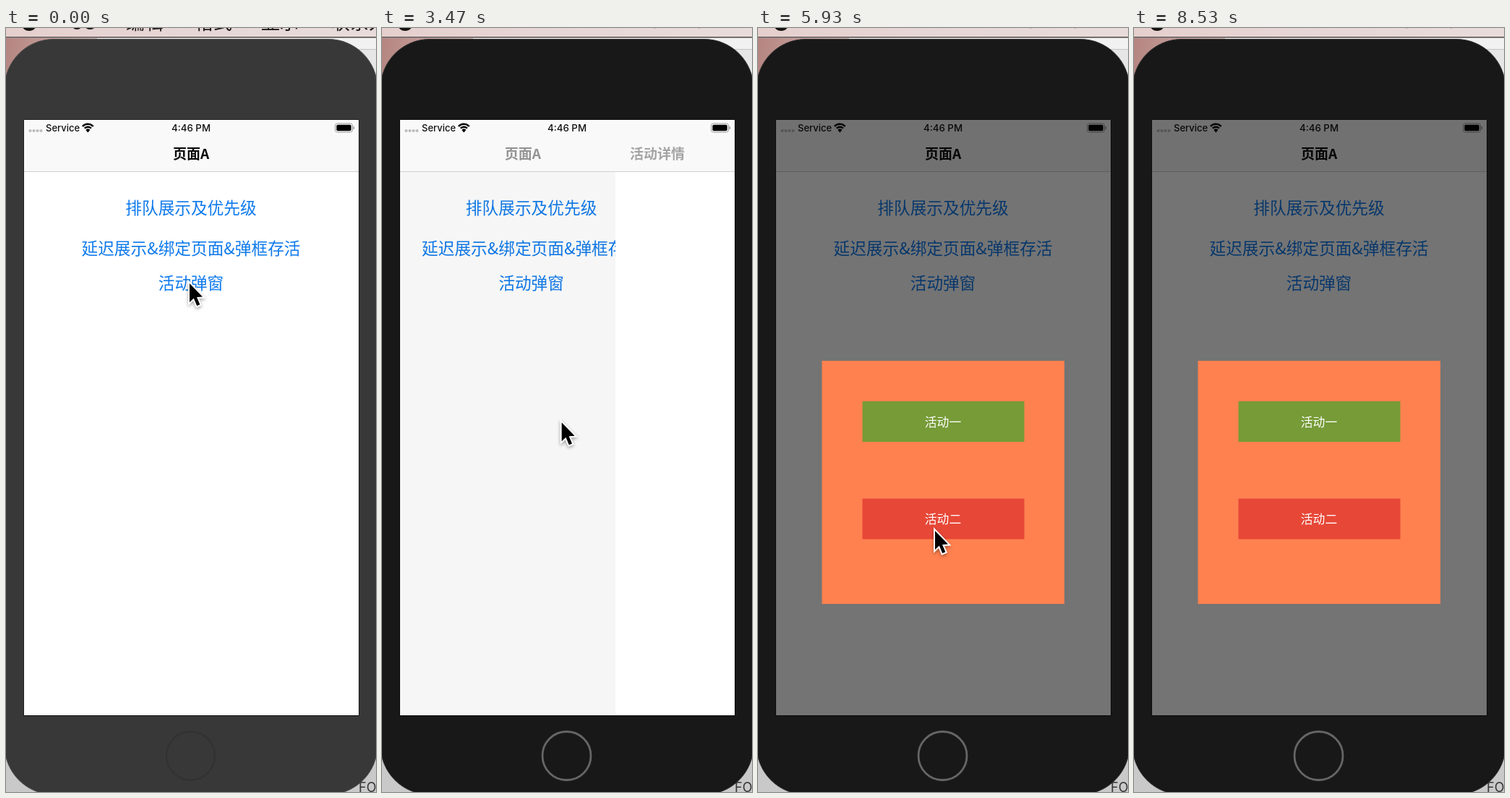
Recreate the animation shown at these times as an HTML page with a canvas. Size 512 by 1056 pixels, loop 8590 ms.

```html
<!DOCTYPE html>
<html lang="zh">
<head>
<meta charset="utf-8">
<style>
html, body { margin: 0; width: 100%; height: 100%; overflow: hidden; background: #ccc; }
canvas { display: block; width: 512px; height: 1056px; }
</style>
</head>
<body>
<canvas id="stage" width="512" height="1056"></canvas>
<script>
const ctx = document.getElementById('stage').getContext('2d');
const LOOP = 8590;
const CJK = '"Noto Sans CJK SC", "Noto Sans CJK", "Noto Sans", sans-serif';
const LATIN = 'Inter, sans-serif';
const SCREEN = { x: 25, y: 127, w: 463, h: 823 };
const BLUE = '#0f7aec';
const ACTIVATE = 1870;
const PUSHES = [3410, 6390];
const POPS = [4540, 7750];
const POPUP_IN = [2130, 4960, 8180];
const POPUP_OUT = [3120, 6180];

// Cursor path: time, x, y of the tip
const CURSOR = [
  [0, 254, 353], [200, 254, 353], [800, 246, 348], [2300, 246, 348],
  [2670, 252, 479], [2900, 249, 546], [3450, 249, 546], [4200, 72, 164],
  [5100, 72, 164], [5780, 245, 695], [6350, 245, 695], [6930, 136, 271],
  [7000, 102, 252], [7250, 74, 168], [7900, 74, 168], [8250, 90, -45], [8590, 90, -45]
];

const clamp = v => Math.max(0, Math.min(1, v));
const mix = (a, b, p) => a + (b - a) * p;
const smooth = p => p * p * (3 - 2 * p);
const easeOut = p => 1 - (1 - p) ** 3;
const progress = (t, start, length) => clamp((t - start) / length);

function rect(x, y, w, h, fill) {
  ctx.fillStyle = fill;
  ctx.fillRect(x, y, w, h);
}

function text(s, x, y, size, color, { weight = 400, align = 'center', font = CJK } = {}) {
  ctx.font = `${weight} ${size}px ${font}`;
  ctx.textAlign = align;
  ctx.textBaseline = 'alphabetic';
  ctx.fillStyle = color;
  ctx.fillText(s, x, y);
}

function path(points, closed) {
  ctx.beginPath();
  points.forEach(([x, y]) => ctx.lineTo(x, y));
  if (closed) ctx.closePath();
}

function faded(alpha, draw) {
  if (alpha <= 0) return;
  ctx.save();
  ctx.globalAlpha *= alpha;
  draw();
  ctx.restore();
}

function gradient(x0, y0, x1, y1, ...colors) {
  const g = ctx.createLinearGradient(x0, y0, x1, y1);
  colors.forEach((c, i) => g.addColorStop(i / (colors.length - 1), c));
  return g;
}

function drawDesktop(active) {
  rect(0, 0, 512, 1056, '#c9c9c9');
  rect(0, 14, 128, 70, gradient(0, 14, 120, 30, '#b58580', '#d2b2ae'));
  rect(126, 14, 386, 70, '#f1f1f1');
  rect(440, 29, 72, 1, '#c4c4c4');
  rect(440, 30, 72, 50, '#e6e6e6');
  rect(0, 0, 512, 12, gradient(0, 0, 512, 0, '#e5cfcd', '#e6d7d6', '#e8dcdb'));
  rect(0, 12, 512, 1.5, '#5c5150');

  ctx.fillStyle = '#151212';
  ctx.beginPath();
  ctx.arc(32, -7, 11, 0, 7);
  ctx.fill();
  const left = { align: 'left', weight: 500 };
  if (active) {
    const bar = { ...left, font: LATIN };
    text('Emulator', 82, 0, 26, '#1d1818', { ...bar, weight: 700 });
    [['File', 225], ['Edit', 292], ['Hardware', 352], ['Debug', 486]]
      .forEach(([s, x]) => text(s, x, 0, 26, '#1d1818', bar));
  } else {
    text('JO', 91, 2, 26, '#1d1818', { ...left, weight: 700, font: LATIN });
    [['编辑', 166], ['格式', 261], ['显示', 353], ['联系人', 450]]
      .forEach(([s, x]) => text(s, x, 2, 26, '#1d1818', left));
  }
  text('FO', 488, 1056, 18, '#333', { align: 'left', font: LATIN });
}

function drawPhone(active) {
  ctx.beginPath();
  ctx.roundRect(-2, 15.5, 516, 1044, 68);
  ctx.fillStyle = active ? '#181818' : '#383838';
  ctx.fill();
  ctx.strokeStyle = active ? '#303030' : '#4a4a4a';
  ctx.lineWidth = 1;
  ctx.stroke();
  ctx.beginPath();
  ctx.arc(255.5, 1006, 33.5, 0, 7);
  ctx.strokeStyle = active ? '#666' : '#313131';
  ctx.lineWidth = active ? 2.8 : 2;
  ctx.stroke();
  rect(24.5, 126.5, 464, 824.5, '#080808');
}

function drawStatusBar() {
  for (let i = 0; i < 4; i++) {
    ctx.beginPath();
    ctx.arc(33.5 + i * 5, 142, 2.1, 0, 7);
    ctx.fillStyle = '#bdbdbd';
    ctx.fill();
  }
  text('Service', 55, 143, 13, '#111', { weight: 500, align: 'left', font: LATIN });
  text('4:46 PM', 256, 143, 13.3, '#111', { weight: 500, font: LATIN });

  ctx.strokeStyle = '#000';
  ctx.lineWidth = 2.4;
  [10.2, 6.3].forEach(r => {
    ctx.beginPath();
    ctx.arc(113.3, 143, r, -Math.PI * 0.76, -Math.PI * 0.24);
    ctx.stroke();
  });
  ctx.fillStyle = '#000';
  ctx.beginPath();
  ctx.moveTo(113.3, 144.5);
  ctx.arc(113.3, 143, 3.6, -Math.PI * 0.8, -Math.PI * 0.2);
  ctx.fill();

  ctx.strokeStyle = '#999';
  ctx.lineWidth = 1;
  ctx.beginPath();
  ctx.roundRect(455.5, 132, 24, 12, 3);
  ctx.stroke();
  ctx.beginPath();
  ctx.roundRect(457.3, 133.8, 20.4, 8.4, 1.8);
  ctx.fill();
  rect(480.5, 136, 1.5, 4, '#999');
}

function drawNavBar(p) {
  rect(25, 127, 463, 71, '#f9f9f9');
  rect(25, 198, 463, 1, '#cfcfcf');
  faded(1 - p * 1.6, () => text('页面A', mix(256, 84, p), 180.5, 19, '#0b0b0b', { weight: 600 }));
  faded(p * 1.6 - 0.6, () => {
    path([[51.5, 164], [41.5, 174.5], [51.5, 185]]);
    ctx.strokeStyle = '#0a7cf5';
    ctx.lineWidth = 3.2;
    ctx.stroke();
  });
  faded(p * 1.6 - 0.6, () => text('页面A', mix(230, 58.5, p), 180.5, 19, '#0a7cf5', { align: 'left' }));
  faded(p, () => text('活动详情', mix(450, 256, p), 180.5, 19, '#0b0b0b', { weight: 600 }));
}

function drawPages(p) {
  rect(25, 127, 463, 823, '#fff');
  if (p < 1) {
    const x = 256 - SCREEN.w * 0.3 * p;
    text('排队展示及优先级', x, 257, 22.7, BLUE);
    text('延迟展示&绑定页面&弹框存活', x, 313, 22.7, BLUE);
    text('活动弹窗', x, 361, 22.6, BLUE);
  }
  if (p > 0) {
    const edge = SCREEN.x + SCREEN.w * (1 - p);
    rect(25, 199, edge - 25, 751, `rgba(0,0,0,${0.1 * p})`);
    rect(edge, 199, SCREEN.w, 751, '#fff');
  }
  drawNavBar(p);
  drawStatusBar();
}

function drawPopup(alpha) {
  faded(alpha, () => {
    rect(25, 127, 463, 823, 'rgba(0,0,0,0.545)');
    rect(88.5, 460, 335.5, 336, '#ff8150');
    rect(144.5, 516, 224, 56, '#769b37');
    rect(144.5, 650.5, 224, 56, '#e74737');
    text('活动一', 256, 550.5, 16.8, '#fff');
    text('活动二', 256, 684.5, 16.8, '#fff');
  });
}

function drawCursor(t) {
  const i = CURSOR.findIndex((key, n) => n > 0 && t <= key[0]);
  const [t0, x0, y0] = CURSOR[i - 1], [t1, x1, y1] = CURSOR[i];
  const p = smooth(progress(t, t0, t1 - t0));
  ctx.save();
  ctx.translate(mix(x0, x1, p), mix(y0, y1, p));
  path([[0, 0], [0, 26], [5.8, 20.5], [10.2, 31], [14.4, 29.2], [10, 19], [18, 18.6]], true);
  ctx.shadowColor = 'rgba(0,0,0,0.35)';
  ctx.shadowBlur = 4;
  ctx.shadowOffsetY = 2;
  ctx.strokeStyle = '#fff';
  ctx.lineWidth = 4;
  ctx.lineJoin = 'miter';
  ctx.miterLimit = 3;
  ctx.stroke();
  ctx.shadowColor = 'transparent';
  ctx.fillStyle = '#000';
  ctx.fill();
  ctx.restore();
}

// Sums eased rises and falls into a 0..1 level
function level(t, rises, falls, length) {
  const sum = starts => starts.reduce((s, at) => s + easeOut(progress(t, at, length)), 0);
  return clamp(sum(rises) - sum(falls));
}

function render(now) {
  const t = now % LOOP;
  const active = t >= ACTIVATE;
  ctx.clearRect(0, 0, 512, 1056);
  drawDesktop(active);
  drawPhone(active);
  ctx.save();
  ctx.beginPath();
  ctx.rect(SCREEN.x, SCREEN.y, SCREEN.w, SCREEN.h);
  ctx.clip();
  drawPages(level(t, PUSHES, POPS, 440));
  drawPopup(level(t, POPUP_IN, POPUP_OUT, 240));
  ctx.restore();
  drawCursor(t);
}

let start;
function tick(now) {
  start ??= now;
  render(Math.max(0, now - start));
  requestAnimationFrame(tick);
}
render(0);
requestAnimationFrame(tick);
</script>
</body>
</html>
```
